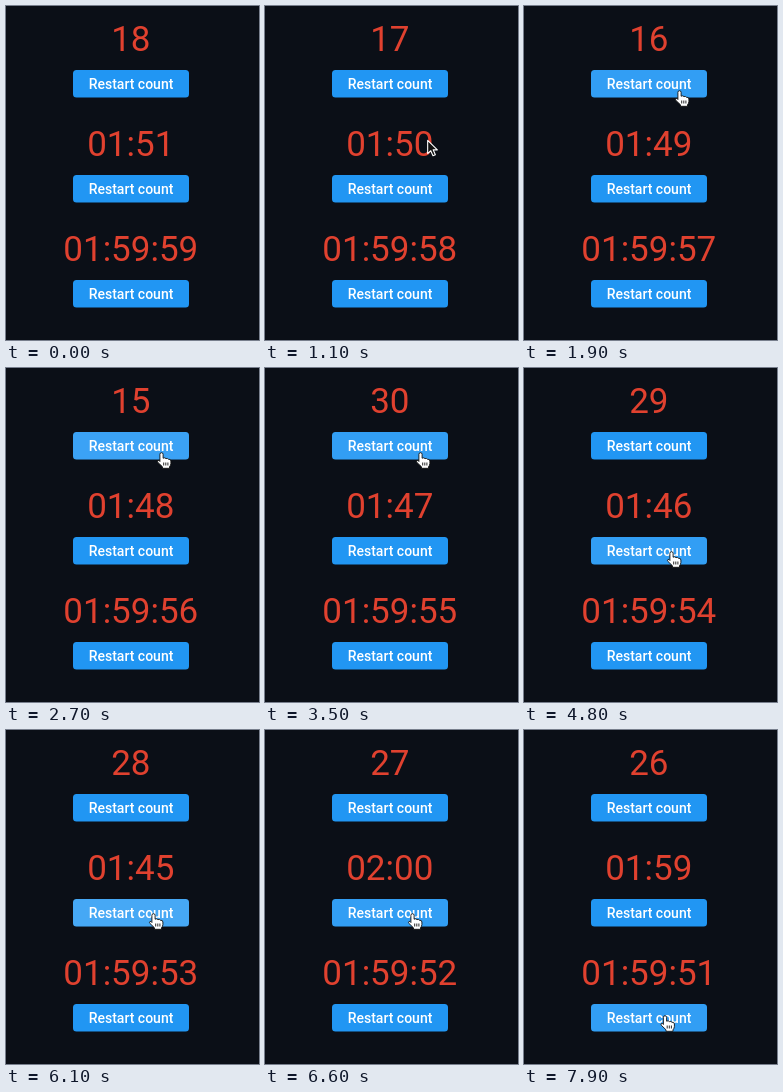
Write an HTML page that moves like this. It is 253x334 px and loops after 8 s.

```html
<!DOCTYPE html>
<html lang="en">
<head>
<meta charset="utf-8">
<title>Countdown timers</title>
<style>
  html, body { margin: 0; width: 100%; height: 100%; overflow: hidden; background: #0b0f17; }
  svg { display: block; width: 253px; height: 334px; font-family: Roboto, sans-serif; text-anchor: middle; }
  .count { font-size: 35px; fill: #e0412f; }
  .label { font-size: 14px; font-weight: 500; fill: #fff; }
  .button { fill: #2196f3; }
  .glow { fill: #fff; opacity: 0; }
  #arrow { fill: #111; stroke: #fff; stroke-width: 1.1; stroke-linejoin: round; }
  #hand { fill: #fff; stroke: #111; stroke-width: .9; stroke-linejoin: round; }
</style>
</head>
<body>
<svg viewBox="0 0 253 334">
  <g id="timers"></g>
  <g id="cursor">
    <path id="arrow" d="M0 0V13.2L3.1 10.4L5.3 15.4L7.7 14.4L5.5 9.5H9.7Z"/>
    <g id="hand">
      <path d="M-1.6 8.5V1.3Q-1.5 -.3 0 -.3T1.6 1.3V5.2Q3.2 4.2 4.5 5.6Q6 4.9 7 6.3Q9.2 5.8 9.4 8V10.5Q9.2 12.5 8 13.8V15.3H1V13.8L-3.6 9.4Q-4.5 8 -3.4 7.4Q-2.5 7.1 -1.6 8.5Z"/>
      <path d="M2.2 9.5V12.5M4.3 9.5V12.5M6.4 9.5V12.5"/>
    </g>
  </g>
</svg>
<script>
const LOOP = 8000, STEP = 100;
const ROW = 105, BUTTON = { x: 67, y: 64, w: 116, h: 27.5 };

// Seconds left at the start; a restart takes effect on a later tick.
const timers = [
  { parts: 1, from: 18, restart: { tick: 4, value: 30 }, press: 2400 },
  { parts: 2, from: 111, restart: { tick: 7, value: 120 }, press: 6100 },
  { parts: 3, from: 7199 }
];

// Cursor path: time, x, y
const path = [
  [900, 166, 158], [1500, 156, 87], [1600, 156, 86], [1800, 156, 86],
  [1900, 155.5, 85], [3900, 155.5, 85], [4400, 150, 148.5],
  [4800, 147.5, 184], [7200, 147.5, 184], [7800, 141, 286], [LOOP, 141, 286]
];

const $ = id => document.getElementById(id);
const { x, y, w, h } = BUTTON;

$('timers').innerHTML = timers.map((_, i) => `
  <g transform="translate(0 ${i * ROW})">
    <text class="count" x="124.8" y="45.3"></text>
    <rect class="button" x="${x}" y="${y}" width="${w}" height="${h}" rx="3.5"/>
    <rect class="glow" x="${x}" y="${y}" width="${w}" height="${h}" rx="3.5"/>
    <text class="label" x="125" y="83">Restart count</text>
  </g>`).join('');

const counts = document.querySelectorAll('.count');
const glows = document.querySelectorAll('.glow');

function format(seconds, parts) {
  const units = [Math.floor(seconds / 3600), Math.floor(seconds / 60) % 60, seconds % 60];
  return units.slice(-parts).map(n => String(n).padStart(2, '0')).join(':');
}

function secondsLeft({ from, restart }, tick) {
  return restart && tick >= restart.tick
    ? restart.value - (tick - restart.tick)
    : from - tick;
}

function cursorAt(t) {
  if (t < path[0][0]) return null;
  const i = path.findIndex(p => p[0] > t);
  const [t0, x0, y0] = path[i - 1], [t1, x1, y1] = path[i];
  const k = (t - t0) / (t1 - t0);
  return { x: x0 + (x1 - x0) * k, y: y0 + (y1 - y0) * k };
}

function hoveredRow(point) {
  return timers.findIndex((_, i) => {
    const top = y + i * ROW;
    return point && point.x >= x && point.x <= x + w && point.y >= top && point.y <= top + h;
  });
}

function draw(t) {
  const tick = Math.floor((t + 500) / 1000);
  const point = cursorAt(t);
  const hovered = hoveredRow(point);

  timers.forEach((timer, i) => {
    const text = format(secondsLeft(timer, tick), timer.parts);
    if (counts[i].textContent !== text) counts[i].textContent = text;
    const age = t - timer.press;
    const press = age >= 0 && age < 500 ? 0.09 * (1 - age / 500) : 0;
    glows[i].style.opacity = (i === hovered ? 0.08 : 0) + press;
  });

  $('cursor').style.display = point ? '' : 'none';
  if (point) $('cursor').setAttribute('transform', `translate(${point.x} ${point.y})`);
  $('hand').style.display = hovered >= 0 ? '' : 'none';
  $('arrow').style.display = hovered >= 0 ? 'none' : '';
}

const start = performance.now();
function frame() {
  const t = (performance.now() - start) % LOOP;
  draw(Math.floor(t / STEP) * STEP);
  requestAnimationFrame(frame);
}
frame();
</script>
</body>
</html>
```
